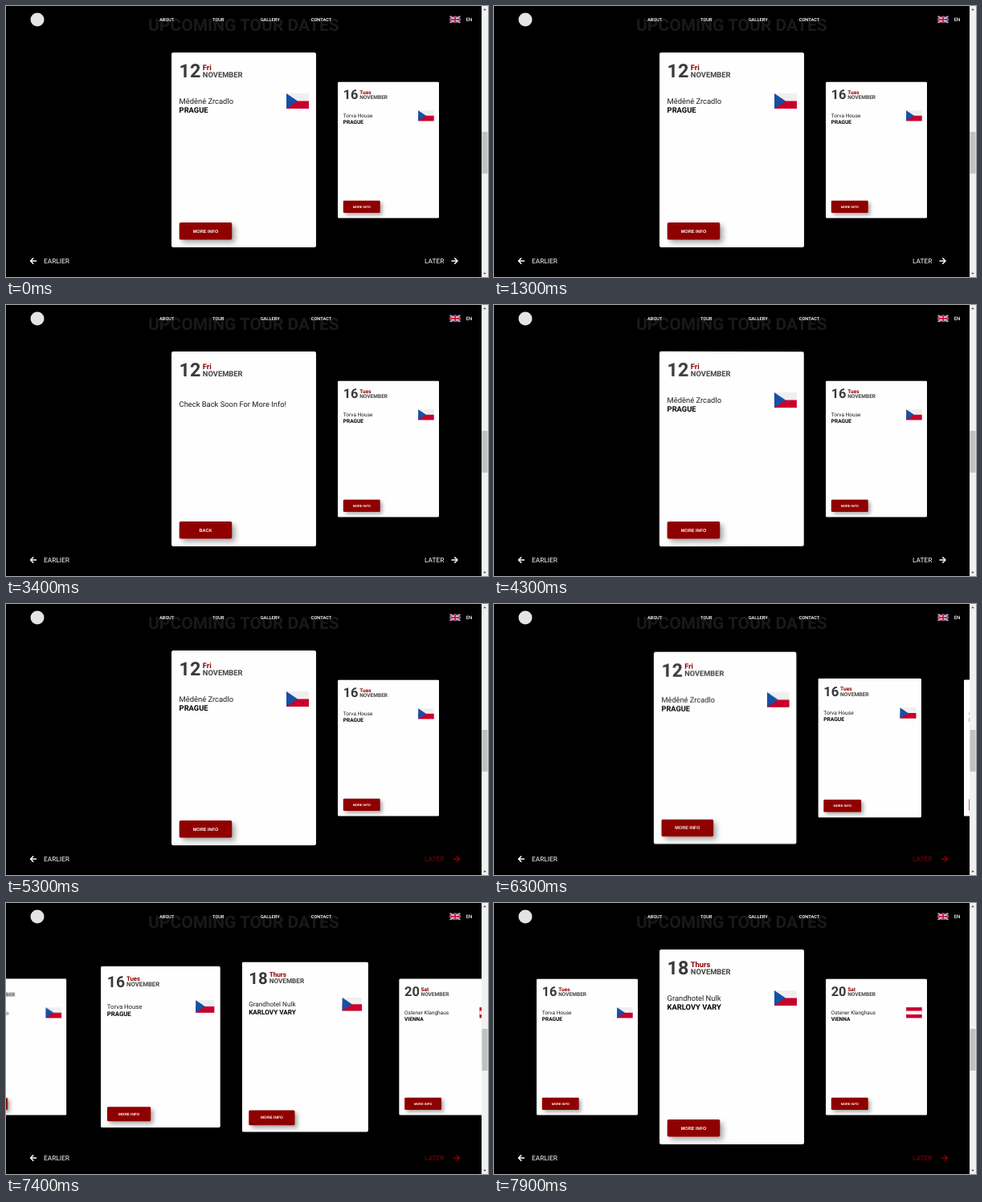
Write an HTML page that moves like this. It is 600 px wide and 338 px high and loops after 8000 ms.

```html
<!DOCTYPE html>
<html lang="en">
<head>
<meta charset="utf-8">
<title>Upcoming tour dates</title>
<style>
  html, body { margin: 0; width: 100%; height: 100%; overflow: hidden; background: #000; }
  #stage { position: relative; width: 600px; height: 338px; overflow: hidden; background: #000; }
  svg { position: absolute; left: 0; top: 0; overflow: visible; }
  text { font-family: Roboto, Arial, sans-serif; font-size: 9.375px; text-rendering: geometricPrecision; }
  .b { font-weight: 700; }
  .nav text { font-size: 5.7px; font-weight: 500; fill: #fff; }
  .step text { font-size: 8.35px; fill: currentColor; }
  .step path { fill: none; stroke: currentColor; stroke-width: 1.5; stroke-linecap: round; stroke-linejoin: round; }
  .card { position: absolute; left: 206px; top: 58px; width: 180px; height: 243px; }
  .card, .face { border-radius: 2px; }
  .two-sided { perspective: 469px; }
  .flip, .face { position: absolute; inset: 0; }
  .two-sided .flip { transform-style: preserve-3d; }
  .two-sided .face { backface-visibility: hidden; }
  .back { transform: rotateY(180deg); }
  .btn { filter: drop-shadow(4px 4px 3px rgba(0, 0, 0, .32)); }
  .btn + text { font: 700 5.6px "Liberation Sans", Arial, sans-serif; fill: #fff; text-anchor: middle; }
</style>
</head>
<body>
<div id="stage">
  <svg width="600" height="338">
    <text class="b" x="177" y="31" style="font-size:21px" fill="#191919">UPCOMING TOUR DATES</text>
  </svg>
  <div id="cards"></div>
  <svg width="600" height="338">
    <circle cx="39" cy="17" r="8.5" fill="#e4e4e4"/>
    <g class="nav">
      <text x="191" y="18.6">ABOUT</text>
      <text x="257" y="18.6">TOUR</text>
      <text x="316.7" y="18.6">GALLERY</text>
      <text x="379.7" y="18.6">CONTACT</text>
      <text x="572.7" y="18.8" style="font-size:6px">EN</text>
    </g>
    <svg x="552.3" y="12.5" width="13.4" height="8.8" viewBox="0 0 60 40" preserveAspectRatio="none" style="overflow:hidden">
      <rect width="60" height="40" fill="#1c2f78"/>
      <path d="M0 0L60 40M60 0L0 40" stroke="#fff" stroke-width="8"/>
      <path d="M0 0L60 40M60 0L0 40" stroke="#c8102e" stroke-width="3"/>
      <path d="M30 0V40M0 20H60" stroke="#fff" stroke-width="13"/>
      <path d="M30 0V40M0 20H60" stroke="#c8102e" stroke-width="8"/>
    </svg>
    <g class="step" color="#fff">
      <path d="M37.5 318H30.7M33.8 314.7L30.5 318L33.8 321.3"/>
      <text x="47" y="321">EARLIER</text>
    </g>
    <g class="step" id="later" color="#fff">
      <text x="521" y="321">LATER</text>
      <path d="M555 318H561.8M558.7 314.7L562 318L558.7 321.3"/>
    </g>
    <rect x="592" width="8" height="338" fill="#f1f1f1"/>
    <rect x="592.5" y="157" width="7" height="52" fill="#c1c1c1"/>
    <path d="M594.2 5.2L596 3L597.8 5.2ZM594.2 332.8L596 335L597.8 332.8Z" fill="#505050"/>
  </svg>
</div>
<script>
const LOOP = 8000;
const STEP = 180;
const SLIDES = [[6282, 6582], [7301, 7601]];

const FLAGS = {
  cz: `<rect width="28" height="19" fill="#efeff0"/><path d="M0 9.5H28V19H0Z" fill="#c8002a"/>
       <path d="M0 0L14 9.5L0 19Z" fill="#1650a4"/>`,
  at: `<rect width="28" height="19" fill="#c8002a"/><path d="M0 6.3H28V12.7H0Z" fill="#f6f6f6"/>`
};

const SHOWS = [
  { day: 12, name: 'Fri', venue: 'Měděné Zrcadlo', city: 'PRAGUE', flag: 'cz', back: 'Check Back Soon For More Info!' },
  { day: 16, name: 'Tues', venue: 'Torva House', city: 'PRAGUE', flag: 'cz' },
  { day: 18, name: 'Thurs', venue: 'Grandhotel Nulk', city: 'KARLOVY VARY', flag: 'cz' },
  { day: 20, name: 'Sat', venue: 'Ostener Klanghaus', city: 'VIENNA', flag: 'at' }
];

const face = (show, body, label, cls = '') => `
  <div class="face ${cls}"><svg width="180" height="243">
    <rect width="180" height="243" rx="2.2" fill="#fefefe"/>
    <text class="b" x="9.6" y="31" style="font-size:23.4px" fill="#3a3a3a">${show.day}</text>
    <text class="b" x="38.8" y="21.6" fill="#8b0000">${show.name}</text>
    <text class="b" x="38.8" y="30.8" fill="#444">NOVEMBER</text>
    ${body}
    <rect class="btn" x="9.7" y="212" width="65.6" height="21.5" rx="1.8" fill="#8f0000"/>
    <text x="42.5" y="224.6">${label}</text>
  </svg></div>`;

const front = s => face(s, `
    <text x="9.6" y="63.8" fill="#1c1c1c">${s.venue}</text>
    <text class="b" x="9.6" y="74.8" fill="#000">${s.city}</text>
    <g transform="translate(143 51)">${FLAGS[s.flag]}</g>`, 'MORE INFO');

const back = s => s.back
  ? face(s, `<text x="9.6" y="69.4" fill="#1c1c1c">${s.back}</text>`, 'BACK', 'back')
  : '';

// Each step: [time, value, easing towards the next step]
const play = (el, prop, steps) => el.animate(
  steps.map(([t, v, easing = 'linear']) => ({ offset: t / LOOP, [prop]: v, easing })),
  { duration: LOOP, iterations: Infinity });

const place = offset => {
  const scale = 1 - 0.3 * Math.min(1, Math.abs(offset));
  return `translateX(${offset * STEP}px) scale(${scale})`;
};

const cards = document.getElementById('cards');
cards.innerHTML = SHOWS.map(s => `
  <div class="card ${s.back ? 'two-sided' : ''}">
    <div class="flip">${front(s)}${back(s)}</div>
  </div>`).join('');

[...cards.children].forEach((card, i) => {
  const steps = [[0, place(i)]];
  SLIDES.forEach(([from, to], n) => {
    steps.push([from, place(i - n), 'ease'], [to, place(i - n - 1)]);
  });
  steps.push([LOOP, place(i - SLIDES.length)]);
  play(card, 'transform', steps);
});

const turn = deg => `rotateY(${deg}deg)`;
play(cards.querySelector('.flip'), 'transform', [
  [0, turn(0)], [1995, turn(0), 'ease'], [2865, turn(180)],
  [3487, turn(180), 'ease'], [4357, turn(0)], [LOOP, turn(0)]
]);

// Hovering the link reddens it and nudges its arrow
const hover = (el, prop, off, on) => play(el, prop, [
  [0, off], [4320, off, 'ease'], [4490, on], [LOOP, on]
]);
const later = document.getElementById('later');
hover(later, 'color', '#fff', '#8b0000');
hover(later.querySelector('path'), 'transform', 'translateX(0px)', 'translateX(2.4px)');
</script>
</body>
</html>
```
